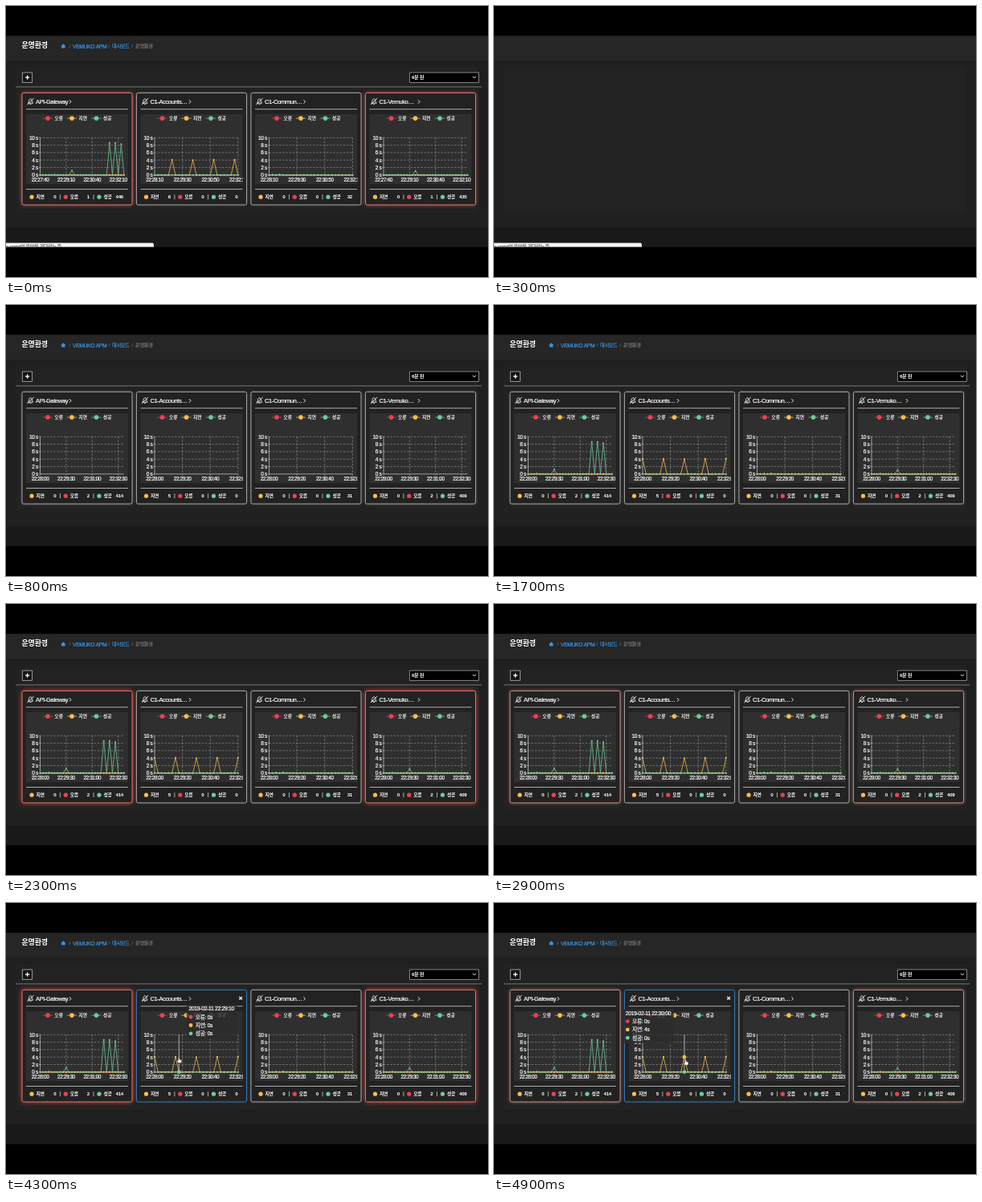
Animation, 600 px wide and 338 px high, one loop 5000 ms. Source, as an HTML page with a canvas:

```html
<!DOCTYPE html>
<html lang="ko">
<head>
<meta charset="utf-8">
<title>Dashboard</title>
<style>
html, body { margin: 0; width: 100%; height: 100%; overflow: hidden; background: #000; }
canvas { display: block; width: 600px; height: 338px; }
</style>
</head>
<body>
<canvas id="stage"></canvas>
<script>
const LOOP = 5000, STEP = 100;
const FONT = '"Liberation Sans", "Noto Sans CJK KR", "Noto Sans CJK", sans-serif';
const RED = '#e84352', YELLOW = '#f9bd53', GREEN = '#6fcb99', BLUE = '#3796e8';
const BASE = 210.8, UNIT = 4.65, TOP = BASE - 10 * UNIT, PITCH = 142.5;

const canvas = document.getElementById('stage');
const ctx = canvas.getContext('2d');
const dpr = window.devicePixelRatio || 1;
canvas.width = 600 * dpr;
canvas.height = 338 * dpr;

const clamp = v => Math.max(0, Math.min(1, v));
const smooth = v => { v = clamp(v); return v * v * (3 - 2 * v); };
const cubicOut = v => 1 - Math.pow(1 - clamp(v), 3);

// start: axis start in seconds after 22:00:00; peaks: point index -> seconds
const cards = [
  { name: 'API-Gateway', arrow: 80, step: 3.6, last: 29, every: 9, alert: true,
    before: { start: 1660, counts: [0, 1, 446], peaks: { 5: .1, 11: 1.2, 24: 8.6, 26: 8.6, 28: 8.3 } },
    after: { start: 1680, counts: [0, 2, 414], peaks: { 3: .1, 9: 1.2, 22: 8.6, 24: 8.6, 26: 8.3 } } },
  { name: 'C1-Accounts…', arrow: 86.5, step: 4.33, last: 24, every: 8, slow: true,
    before: { start: 1690, counts: [6, 0, 0], peaks: { 5: 4.1, 11: 4, 17: 4.1, 23: 4.1 } },
    after: { start: 1680, counts: [5, 0, 0], peaks: { 0: 4.1, 6: 4.1, 12: 4, 18: 4.1, 24: 4.1 } } },
  { name: 'C1-Commun…', arrow: 86.5, step: 4.33, last: 24, every: 8,
    before: { start: 1690, counts: [0, 0, 32], peaks: { 1: .1, 3: .15 } },
    after: { start: 1680, counts: [0, 0, 31], peaks: { 2: .1, 4: .15 } } },
  { name: 'C1-Vemuko…', arrow: 86.5, step: 3.6, last: 29, every: 9, alert: true,
    before: { start: 1660, counts: [0, 1, 435], peaks: { 5: .1, 11: 1.1 } },
    after: { start: 1680, counts: [0, 2, 409], peaks: { 3: .1, 9: 1.1 } } }
];

// Regular weight gets a hairline outline for a medium look
function text(str, x, y, size, color = '#fff', opt = {}) {
  ctx.font = `${opt.weight || 400} ${size}px ${FONT}`;
  ctx.textAlign = opt.align || 'left';
  ctx.textBaseline = 'alphabetic';
  ctx.letterSpacing = (opt.gap || 0) + 'px';
  ctx.fillStyle = ctx.strokeStyle = color;
  ctx.fillText(str, x, y + size * .36);
  if (!opt.weight) {
    ctx.lineWidth = .2;
    ctx.strokeText(str, x, y + size * .36);
  }
}

function rect(x, y, w, h, color) {
  ctx.fillStyle = color;
  ctx.fillRect(x, y, w, h);
}

function dot(x, y, r, color) {
  ctx.fillStyle = color;
  ctx.beginPath();
  ctx.arc(x, y, r, 0, Math.PI * 2);
  ctx.fill();
}

function path(points, color, width = 1) {
  ctx.strokeStyle = color;
  ctx.lineWidth = width;
  ctx.beginPath();
  points.forEach(([x, y], i) => i ? ctx.lineTo(x, y) : ctx.moveTo(x, y));
  ctx.stroke();
}

function clock(sec) {
  const two = n => String(n).padStart(2, '0');
  return `22:${two(Math.floor(sec / 60))}:${two(sec % 60)}`;
}

function background() {
  rect(0, 0, 600, 338, '#000');
  rect(0, 37.3, 600, 263.2, '#1f1f1f');
  rect(0, 37.3, 600, 30.7, '#262626');
  rect(12, 76, 576, 182, '#222');
  rect(0, 276, 600, 24.5, '#191919');
}

function header() {
  text('운영환경', 19.5, 48.9, 9, '#fff', { weight: 700, gap: -.2 });
  ctx.fillStyle = BLUE;
  ctx.beginPath();
  ctx.moveTo(71.3, 47.2);
  ctx.lineTo(74.4, 50.2);
  ctx.lineTo(73.5, 50.2);
  ctx.lineTo(73.5, 52.4);
  ctx.lineTo(69.1, 52.4);
  ctx.lineTo(69.1, 50.2);
  ctx.lineTo(68.2, 50.2);
  ctx.fill();
  for (const x of [78.5, 127.5, 156.5]) text('/', x, 50.2, 6, '#666');
  text('VEMUKO APM', 83, 50.2, 6.9, BLUE, { gap: -.45 });
  text('대시보드', 132, 50.2, 6.2, BLUE, { gap: -.3 });
  text('운영환경', 161, 50.2, 6.2, '#777', { gap: -.3 });
}

function toolbar() {
  const box = (x, w, fill, edge) => {
    rect(x, 82.7, w, 13, fill);
    ctx.strokeStyle = edge;
    ctx.lineWidth = .9;
    ctx.strokeRect(x + .4, 83, w - .8, 12.4);
  };
  box(20, 13, '#161616', '#aaa');
  path([[24, 89.1], [29.2, 89.1]], '#fff', 1.3);
  path([[26.6, 86.5], [26.6, 91.7]], '#fff', 1.3);
  box(502, 87, '#000', '#999');
  text('6분 전', 505, 89.1, 6.2, '#fff', { weight: 700, gap: -.4 });
  path([[581, 87.8], [583, 89.8], [585, 87.8]], '#fff');
  rect(12, 100.4, 580, 1, '#777');
}

function bell(x, y) {
  ctx.strokeStyle = '#fff';
  ctx.lineWidth = .8;
  ctx.beginPath();
  ctx.moveTo(x - 3.2, y + 2.2);
  ctx.quadraticCurveTo(x - 1.8, y + 1, x - 1.9, y - .8);
  ctx.bezierCurveTo(x - 1.8, y - 4, x + 1.8, y - 4, x + 1.9, y - .8);
  ctx.quadraticCurveTo(x + 1.8, y + 1, x + 3.2, y + 2.2);
  ctx.closePath();
  ctx.moveTo(x - 1, y + 3.4);
  ctx.lineTo(x + 1, y + 3.4);
  ctx.stroke();
  path([[x - 4, y + 4], [x + 4.2, y - 4]], '#fff', .9);
}

function frame(fill, border, glow, blur) {
  ctx.save();
  ctx.shadowColor = glow;
  ctx.shadowBlur = blur * dpr;
  ctx.beginPath();
  ctx.roundRect(20, 108.4, 137, 139.6, 2);
  ctx.fillStyle = fill;
  ctx.fill();
  ctx.restore();
  ctx.strokeStyle = border;
  ctx.lineWidth = 1;
  ctx.stroke();
}

function series(card, data, color, active) {
  const pts = [];
  for (let i = 0; i <= card.last; i++) {
    const v = active ? data.peaks[i] || 0 : 0;
    pts.push([42.5 + i * card.step, BASE - v * UNIT]);
  }
  path(pts, color, .75);
  for (const [x, y] of pts) dot(x, y, 1.05, color);
}

function chart(card, data, reveal) {
  rect(25, 135, 127, 87, '#2f2f2f');
  [['오류', 52, RED], ['지연', 82, YELLOW], ['성공', 112.5, GREEN]].forEach(([label, x, color]) => {
    path([[x - 6, 140.1], [x + 6, 140.1]], color, .75);
    dot(x, 140.1, 2.8, color);
    text(label, x + 8.5, 140.1, 5.6);
  });
  const right = 42.5 + card.step * card.last;
  ctx.save();
  ctx.beginPath();
  ctx.rect(25, 135, 127.5, 90);
  ctx.clip();
  ctx.setLineDash([2.4, 1.8]);
  for (let s = 2; s <= 10; s += 2) path([[42.5, BASE - s * UNIT], [right, BASE - s * UNIT]], '#8c8c8c', .7);
  for (let i = card.every; i <= card.last; i += card.every) {
    const x = 42.5 + i * card.step;
    path([[x, TOP], [x, BASE]], '#8c8c8c', .7);
  }
  ctx.setLineDash([]);
  path([[42.5, TOP], [42.5, BASE], [right, BASE]], '#ccc', .7);
  for (let s = 0; s <= 10; s += 2) {
    const y = BASE - s * UNIT;
    path([[40.8, y], [42.5, y]], '#ccc', .6);
    text(s + ' s', 40, y, 6.6, '#fff', { align: 'right', gap: -.35 });
  }
  for (let i = 0; i <= card.last; i += card.every) {
    const x = 42.5 + i * card.step;
    path([[x, BASE], [x, BASE + 1.8]], '#ccc', .6);
    text(clock(data.start + i * 10), x, 217, 6.4, '#fff', { align: 'center', gap: -.4 });
  }
  if (reveal > 0) {
    ctx.beginPath();
    ctx.rect(40, 150, (right - 38) * reveal, 66);
    ctx.clip();
    series(card, data, RED, false);
    series(card, data, YELLOW, card.slow);
    series(card, data, GREEN, !card.slow);
  }
  ctx.restore();
}

function footer(counts) {
  const bold = { weight: 700, gap: -.3 };
  [['지연', 32, YELLOW, 62.5], ['오류', 74.3, RED, 104], ['성공', 116, GREEN, 146]].forEach(([label, x, color, end], i) => {
    dot(x, 238.2, 2.6, color);
    text(label, x + 5.5, 238.2, 5.8, '#fff', bold);
    if (counts) text(counts[i], end, 238.2, 6.2, '#fff', { ...bold, align: 'right' });
    else if (i === 1) text('×', x, 238, 3.5, '#fbb', { align: 'center' });
  });
  rect(67, 235.2, .8, 6, '#ccc');
  rect(108.6, 235.2, .8, 6, '#ccc');
}

function drawCard(card, i, t, hover) {
  const loading = t >= 400 && t < 700;
  const data = t < 400 ? card.before : card.after;
  ctx.save();
  ctx.translate(i * PITCH, 0);

  const phase = ((t + 300) % 1000) / 1000;
  const pulse = card.alert && !loading ? smooth((1 - Math.abs(phase * 2 - 1)) * 1.25) : 0;
  const mix = (a, b) => Math.round(a + (b - a) * pulse);
  let border = `rgb(${mix(160, 225)},${mix(160, 112)},${mix(160, 104)})`;
  let glow = `rgba(255,${mix(255, 80)},${mix(255, 70)},${.35 + .5 * pulse})`;
  if (hover) [border, glow] = ['#3079b8', 'rgba(59,159,230,.45)'];
  frame(loading ? '#4b4b4b' : '#222', border, glow, 3 + 3 * pulse);

  bell(30.5, 119);
  text(card.name, 37, 119.3, 7.6, '#fff', { gap: -.42 });
  const a = card.arrow;
  path([[a - 1, 117.2], [a + 1, 119.4], [a - 1, 121.6]], '#fff', .9);
  rect(25, 128.2, 127, 1, '#aaa');
  rect(25, 228, 127, 1, '#aaa');
  if (loading) {
    rect(91.5, 183.5, 1.6, .8, '#999');
    footer();
  } else {
    chart(card, data, t < 400 ? 1 : cubicOut((t - 800) / 1000));
    footer(data.counts);
  }
  if (hover) {
    path([[147.8, 116.9], [151.4, 120.5]], '#fff', 1.3);
    path([[151.4, 116.9], [147.8, 120.5]], '#fff', 1.3);
  }
  ctx.restore();
}

function pointer(t) {
  const enter = smooth((t - 3200) / 400), slide = smooth((t - 4200) / 500);
  return { x: 192 + 20 * enter + 26 * slide, y: 226 - 31 * enter + 3 * slide };
}

function hand(x, y) {
  ctx.fillStyle = '#fff';
  ctx.strokeStyle = '#222';
  ctx.lineWidth = .5;
  ctx.beginPath();
  ctx.moveTo(x - .9, y - 3);
  ctx.lineTo(x + .7, y - 3);
  ctx.lineTo(x + .7, y - .4);
  ctx.lineTo(x + 3.6, y + .4);
  ctx.lineTo(x + 3.2, y + 4.2);
  ctx.lineTo(x - .9, y + 4.2);
  ctx.lineTo(x - 3, y + 1);
  ctx.lineTo(x - .9, y + 1.4);
  ctx.closePath();
  ctx.fill();
  ctx.stroke();
}

function tooltip({ x, y }) {
  const card = cards[1], data = card.after;
  const i = Math.round((x - 1 - 185) / card.step);
  const px = 185 + i * card.step, v = data.peaks[i] || 0;
  path([[px, TOP], [px, BASE]], '#ccc', .8);
  dot(px, BASE - v * UNIT, 2.4, YELLOW);
  dot(px, BASE, 2.4, GREEN);

  const left = x > 222 ? x - 77 : x + 10, top = 126 + (y - 195) * 2;
  ctx.fillStyle = 'rgba(44,44,44,.8)';
  ctx.beginPath();
  ctx.roundRect(left, top, 63, 43, 2);
  ctx.fill();
  const tight = { gap: -.33 };
  text('2019-02-11 ' + clock(data.start + i * 10), left + 2.8, top + 5.3, 6.8, '#fff', tight);
  [['오류', RED, 0], ['지연', YELLOW, v], ['성공', GREEN, 0]].forEach(([label, color, n], k) => {
    const cy = top + 15.6 + k * 10.3;
    dot(left + 5.3, cy, 2.4, color);
    text(`${label}: ${n}s`, left + 11, cy, 6.8, '#fff', tight);
  });
}

function statusBar(t) {
  const old = t < 400;
  ctx.save();
  ctx.beginPath();
  ctx.roundRect(-3, 295.5, 187, 7, 2);
  ctx.clip();
  rect(0, 295, 184, 5.5, old ? '#f5f5f5' : '#bdbdbd');
  ctx.beginPath();
  ctx.rect(0, 295, 184, 5.5);
  ctx.clip();
  text(old ? 'a-portal의 응답을 기다리는 중' : '다리는 중', 0, 300, 6, '#555', { gap: -.3 });
  ctx.restore();
}

function draw(t) {
  ctx.setTransform(dpr, 0, 0, dpr, 0, 0);
  ctx.lineJoin = 'round';
  background();
  const blank = t >= 200 && t < 400;
  if (!blank) {
    const hover = t >= 3300;
    header();
    toolbar();
    cards.forEach((card, i) => drawCard(card, i, t, hover && i === 1));
    if (hover) {
      const p = pointer(t);
      if (p.y < BASE) tooltip(p);
      hand(p.x + .5, p.y);
    }
  }
  if (t < 600) statusBar(t);
}

const begin = performance.now();
function tick() {
  const t = (performance.now() - begin) % LOOP;
  draw(Math.floor(t / STEP) * STEP);
  requestAnimationFrame(tick);
}
tick();
</script>
</body>
</html>
```
